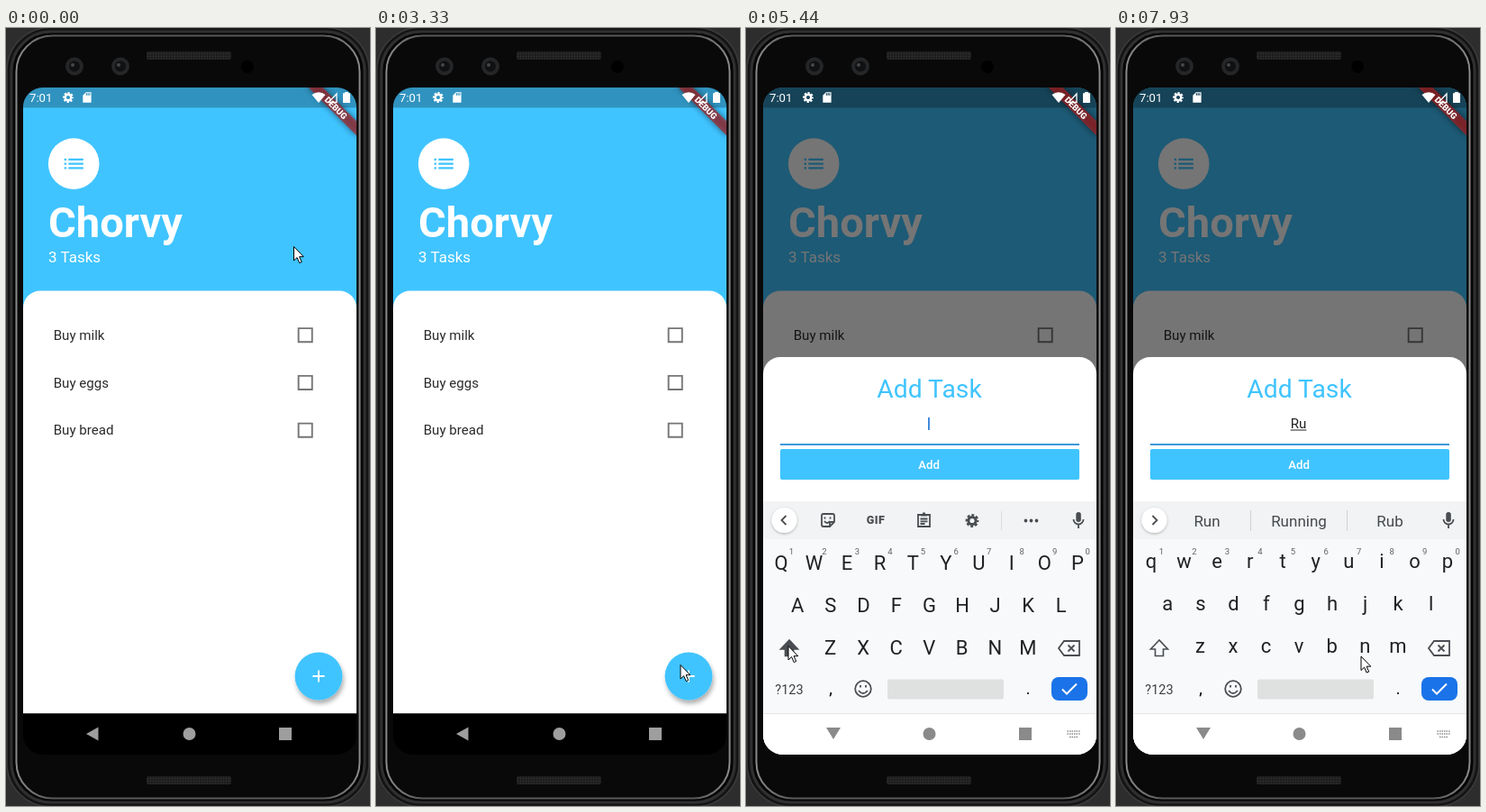
Animation of 404x863 px, one loop 8 s. Source, as an HTML page:

```html
<!DOCTYPE html>
<html lang="en">
<head>
<meta charset="utf-8">
<title>To-do app</title>
<style>
  html, body { margin: 0; width: 100%; height: 100%; overflow: hidden; background: #2d2d2d; }
  svg { display: block; width: 404px; height: 863px; font-family: Roboto, sans-serif; }
  .mid { text-anchor: middle; }
  .line { fill: none; stroke: #4a4d51; stroke-width: 1.8; }
</style>
</head>
<body>
<svg viewBox="0 0 404 863">
  <defs>
    <clipPath id="screen"><rect x="19" y="66" width="370" height="740" rx="22"/></clipPath>
    <clipPath id="fabClip"><circle cx="347" cy="719" r="26.4"/></clipPath>
    <linearGradient id="metal" x2="1" y2="0">
      <stop stop-color="#8a8a8a"/><stop offset=".1" stop-color="#5a5a5a"/>
      <stop offset=".9" stop-color="#5a5a5a"/><stop offset="1" stop-color="#8a8a8a"/>
    </linearGradient>
    <pattern id="mesh" width="3" height="3" patternUnits="userSpaceOnUse">
      <rect width="3" height="3" fill="#1b1b1b"/><circle cx="1.5" cy="1.5" r="1" fill="#303030"/>
    </pattern>
    <filter id="shadow" x="-50%" y="-50%" width="200%" height="200%">
      <feDropShadow dx="1.5" dy="4" stdDeviation="2.8" flood-opacity=".32"/>
    </filter>
    <filter id="soft" x="-50%" y="-50%" width="200%" height="200%">
      <feDropShadow dx="0" dy="1" stdDeviation="1.5" flood-opacity=".3"/>
    </filter>
    <filter id="blur" x="-20%" y="-150%" width="140%" height="400%">
      <feGaussianBlur stdDeviation="3.5"/>
    </filter>
    <g id="gear" fill="none" stroke="currentColor">
      <circle r="4.1" stroke-width="3"/>
      <circle r="6.2" stroke-width="2.4" stroke-dasharray="2.87 2" stroke-dashoffset="1.4"/>
    </g>
  </defs>

  <!-- phone body -->
  <rect x="1" y="-.5" width="402" height="864" rx="48" fill="#141414" stroke="#3c3c3c" stroke-width="1.5"/>
  <rect x="6" y="4" width="392" height="855" rx="44" fill="#050505" stroke="#303030" stroke-width="3"/>
  <rect x="11.5" y="8.5" width="381" height="846" rx="40" fill="#090909" stroke="url(#metal)" stroke-width="2"/>
  <rect x="156" y="26" width="94" height="9" rx="2" fill="url(#mesh)"/>
  <rect x="156" y="830" width="94" height="9" rx="2" fill="url(#mesh)"/>
  <g id="lenses"></g>
  <circle cx="268" cy="43" r="7" fill="#000"/>

  <g clip-path="url(#screen)">
    <!-- task list -->
    <rect x="19" y="66" width="370" height="400" fill="#40c4ff"/>
    <rect x="19" y="66" width="370" height="22.4" opacity=".25"/>
    <circle cx="75.2" cy="150.6" r="28.3" fill="#fff"/>
    <path transform="translate(61.1 136.5) scale(1.178)" fill="#40c4ff"
      d="M3 7h2v2H3zM3 11h2v2H3zM3 15h2v2H3zM7 7h14v2H7zM7 11h14v2H7zM7 15h14v2H7z"/>
    <g fill="#fff">
      <text x="47" y="232" font-size="47.1" font-weight="700">Chorvy</text>
      <text x="47" y="260" font-size="17">3 Tasks</text>
    </g>
    <path d="M19 310.5a19 19 0 0 1 19-19h332a19 19 0 0 1 19 19v450H19z" fill="#fff"/>
    <g id="tasks" font-size="15.1" fill="#2b2b2b"></g>
    <g filter="url(#shadow)"><circle cx="347" cy="719" r="26.4" fill="#40c4ff"/></g>
    <circle id="ripple" cx="340" cy="710" fill="#fff" clip-path="url(#fabClip)"/>
    <path d="M340.4 719h13.2M347 712.4v13.2" stroke="#fff" stroke-width="1.9"/>
    <rect id="barrier" x="19" y="66" width="370" height="694.5"/>

    <!-- bottom sheet -->
    <g id="sheet" class="mid">
      <path d="M19 384a19 19 0 0 1 19-19h332a19 19 0 0 1 19 19v142H19z" fill="#fff"/>
      <rect x="19" y="526" width="370" height="280" fill="#fafafa"/>
      <text x="203.5" y="410" font-size="28.3" fill="#40c4ff">Add Task</text>
      <text id="typed" x="202.5" y="444" font-size="15.1" fill="#212121"></text>
      <rect id="typedLine" y="445.5" height="1" fill="#212121"/>
      <rect id="caret" y="432" width="1.9" height="14" fill="#3a87dd"/>
      <rect x="38" y="461" width="332" height="2" fill="#3d98dc"/>
      <rect x="38" y="467" width="332" height="34" rx="2" fill="#40c4ff"/>
      <text x="203" y="489" font-size="13.2" font-weight="500" fill="#fff">Add</text>
    </g>

    <!-- keyboard -->
    <g id="keyboard" class="mid">
      <rect x="19" y="525" width="370" height="281" fill="#f8f9fb"/>
      <rect x="19" y="525" width="370" height="42" fill="#f1f3f4"/>
      <rect x="19" y="760" width="370" height="46" fill="#fff"/>
      <path d="M19 760.5h370" stroke="#e4e6e8"/>
      <circle cx="42.5" cy="546" r="14" fill="#fff" filter="url(#soft)"/>
      <path id="chevron" class="line"/>
      <g id="tools">
        <path class="line" d="M86 539h10a2 2 0 0 1 2 2v7l-5 5h-7a2 2 0 0 1-2-2v-10a2 2 0 0 1 2-2zM98 548h-5v5M87 547q3 4 6 0M87.5 542.5v2M93.5 542.5v2"/>
        <text x="144" y="550.3" font-size="12.5" font-weight="900" fill="#4a4d51" letter-spacing=".5">GIF</text>
        <path class="line" d="M191 540h13v13h-13zM194 540.5h7M193.5 544.5h8M193.5 547.3h8M193.5 550h5M196 538.5h3"/>
        <use href="#gear" x="251" y="546.5" color="#4a4d51"/>
        <path d="M283.5 536v21" stroke="#dadce0"/>
        <path d="M310.5 546.5h12.1" stroke="#4a4d51" stroke-width="3.8" stroke-linecap="round" stroke-dasharray="0 6"/>
      </g>
      <g id="hints" font-size="17" fill="#45484c">
        <path d="M149.5 535v23M256.5 535v23" stroke="#cfd2d5"/>
      </g>
      <rect x="366.3" y="537" width="5.5" height="11" rx="2.7" fill="#4a4d51"/>
      <path class="line" d="M363.5 545a5.5 5.5 0 0 0 11 0M369 551v4"/>
      <g id="keys" font-size="22" fill="#202124"></g>
      <path id="shift" d="M48 679l-9.5 10h5v7.5h9v-7.5h5z" stroke="#4a4d51" stroke-width="1.6"/>
      <path class="line" d="M353 680h17v16h-17l-6-8zM357.5 684.5l7 7M364.5 684.5l-7 7"/>
      <text x="48" y="738.5" font-size="14.5" fill="#3c4043">?123</text>
      <text x="94" y="739" font-size="18">,</text>
      <text x="313" y="739" font-size="18">.</text>
      <circle class="line" cx="130" cy="733" r="8.8"/>
      <path class="line" d="M125 735q5 6 10 0M127 729v2.5M133 729v2.5"/>
      <rect x="157" y="722.5" width="129" height="22" rx="2" fill="#dfe1e1"/>
      <rect x="339" y="720" width="40" height="26" rx="8" fill="#1a73e8"/>
      <path d="M351 733.5l5 5 11-11" fill="none" stroke="#fff" stroke-width="2"/>
      <g id="popup">
        <rect x="-18.5" y="506" width="37" height="105" rx="4" fill="#f2f4f5" filter="url(#soft)"/>
        <text id="popupKey" y="542" font-size="27"></text>
        <text x="9" y="554" font-size="13">…</text>
      </g>
    </g>

    <!-- navigation bar -->
    <g id="navLight" fill="#8a8a8a">
      <path d="M89 776h16l-8 13z"/><circle cx="203.5" cy="783" r="7"/><path d="M303 776h14v14h-14z"/>
      <path d="M356.5 780h14M356.5 783h14M359 786.5h9" stroke="#8a8a8a" stroke-width="1.5" stroke-dasharray="1.5 1"/>
    </g>
    <g id="navDark" fill="#9e9e9e">
      <rect x="19" y="760.5" width="370" height="45.5" fill="#000"/>
      <path d="M89 783l13.5-7.5v15z"/><circle cx="203.5" cy="783" r="7"/><path d="M303 776h14v14h-14z"/>
    </g>

    <!-- debug ribbon and status icons -->
    <g transform="translate(389 66) rotate(45)">
      <rect x="-37.7" y="26.4" width="75.4" height="11.3" opacity=".5" filter="url(#blur)"/>
      <rect x="-37.7" y="26.4" width="75.4" height="11.3" fill="#b71c1c" opacity=".63"/>
      <text class="mid" y="35.5" font-size="9.6" font-weight="900" fill="#fff">DEBUG</text>
    </g>
    <g fill="#fff" color="#fff">
      <text x="26" y="82" font-size="13.2">7:01</text>
      <use href="#gear" transform="translate(69 77) scale(.8)"/>
      <path transform="translate(83 70) scale(.58)" fill-rule="evenodd"
        d="M18 2h-8L4 8v14h16V2zM10 4h2v4h-2zM13 4h2v4h-2zM16 4h2v4h-2z"/>
      <path d="M347 83l-7.5-9a12 12 0 0 1 15 0z"/>
      <path d="M358 82.5h9v-9.5z" fill="none" stroke="#fff" stroke-width="1.3"/>
      <path d="M376 71h4v1.3h2v10.7h-8v-10.7h2z"/>
    </g>
  </g>

  <circle id="click" r="12" fill="#ffff50" fill-opacity=".75"/>
  <path id="cursor" d="M.5.5v15.5l3.6-3.4 2.6 6 2.5-1.1-2.6-5.8h4.7z" fill="#fff" stroke="#000"/>
</svg>

<script>
const $ = id => document.getElementById(id);
const DURATION = 8000;
const FOCUS = 4000, TYPE_R = 6380, TYPE_U = 7180;
const CHECK = 1380, UNCHECK = 2220, SHEET = 3690, IME = 3950;

function add(parent, tag, attrs, text = '') {
  const el = document.createElementNS('http://www.w3.org/2000/svg', tag);
  set(el, attrs);
  el.textContent = text;
  return parent.appendChild(el);
}
function set(el, attrs) { for (const name in attrs) el.setAttribute(name, attrs[name]); }
const show = (el, on) => { el.style.display = on ? '' : 'none'; };
const clamp = v => Math.max(0, Math.min(1, v));
const progress = (t, start, length) => clamp((t - start) / length);
const between = (t, [a, b]) => t >= a && t < b;

for (const x of [76, 127]) {
  add($('lenses'), 'circle', { cx: x, cy: 42.5, r: 10, fill: '#252628' });
  add($('lenses'), 'circle', { cx: x, cy: 42.5, r: 6, fill: '#101113' });
  add($('lenses'), 'circle', { cx: x - 2, cy: 41, r: 2, fill: '#44474b' });
}

const tasks = ['Buy milk', 'Buy eggs', 'Buy bread'].map((name, i) => {
  const y = 340.7 + i * 52.75;
  const label = add($('tasks'), 'text', { x: 52.7, y: y + 5.2 }, name);
  const box = add($('tasks'), 'path', { 'fill-rule': 'evenodd' });
  return { y, label, box };
});
const milk = tasks[0];
const milkTick = add($('tasks'), 'path', { d: 'M327 341l3.8 3.8 7-7.5', fill: 'none', stroke: '#fff', 'stroke-width': 1.9, pathLength: 1 });

const keys = [];
['qwertyuiop', 'asdfghjkl', 'zxcvbnm'].forEach((row, r) => [...row].forEach((letter, i) => {
  const x = [39, 57.3, 93.5][r] + i * 36.55, y = 598.7 + r * 47.3;
  keys.push({ letter, y, el: add($('keys'), 'text', { x }) });
  if (!r) add($('keys'), 'text', { x: x + 11.3, y: 583.5, 'font-size': 9.5, fill: '#5f6368' }, (i + 1) % 10);
}));
const hints = [101, 203, 304].map(x => add($('hints'), 'text', { x, y: 553 }));

// time, x, y of the pointer tip
const path = [
  [200, 319, 242], [640, 338, 305], [1000, 332, 338], [2340, 332, 338], [2850, 324, 590],
  [2900, 324, 590], [3330, 337.5, 706], [3650, 337.5, 706], [4050, 241.5, 587], [4360, 195, 600],
  [4450, 195, 600], [5290, 46.5, 685], [5440, 46.5, 685], [5990, 151.5, 594], [6400, 151.5, 594],
  [6600, 206, 596], [6700, 206, 596], [6920, 258, 596], [7250, 258, 596], [7700, 273, 694],
  [7780, 273, 694], [7930, 271.5, 696.5]
];
function pointer(t) {
  const next = path.findIndex(p => p[0] > t);
  if (next < 1) return path.at(next).slice(1);
  const [a, b] = [path[next - 1], path[next]];
  const k = progress(t, a[0], b[0] - a[0]), s = k * k * (3 - 2 * k);
  return [a[1] + (b[1] - a[1]) * s, a[2] + (b[2] - a[2]) * s];
}

const clicks = [[1240, 1380], [2070, 2220], [3500, 3580], [5360, 5440], [6140, TYPE_R], [7090, TYPE_U]];

// The box shrinks by its border width halfway, while the hole closes.
function drawCheckbox({ y, box }, checked) {
  const fill = clamp(checked * 2);
  const outer = 8.5 - .95 * (1 - Math.abs(checked * 2 - 1)), hole = 6.6 * (1 - fill);
  const square = r => `M${332.2 - r} ${y - r}h${2 * r}v${2 * r}h${-2 * r}z`;
  set(box, { d: square(outer) + square(hole) });
  box.style.fill = `color-mix(in srgb, #40c4ff ${fill * 100}%, #757575)`;
}

function drawTasks(t) {
  const checked = progress(t, CHECK, 200) - progress(t, UNCHECK, 200);
  for (const task of tasks) drawCheckbox(task, task === milk ? checked : 0);
  show(milkTick, checked > .5);
  set(milkTick, { 'stroke-dasharray': `${clamp(checked * 2 - 1)} 2` });
  milk.label.style.textDecoration = between(t, [CHECK, UNCHECK]) ? 'line-through' : 'none';
  set($('ripple'), { r: 36 * progress(t, 3500, 230), opacity: .25 * (1 - progress(t, 3650, 200)) });
}

function drawSheet(t) {
  const rise = 1 - (1 - progress(t, SHEET, 250)) ** 3;
  const ime = progress(t, IME, 250), fade = 1 - (1 - ime) ** 2;
  set($('barrier'), { opacity: .54 * progress(t, SHEET, 250) });
  show($('sheet'), rise > 0);
  set($('sheet'), { transform: `translate(0 ${t < IME ? 235 + 161 * (1 - rise) : 0})` });
  show($('keyboard'), ime > 0);
  set($('keyboard'), { transform: `translate(0 ${208 * (1 - ime) ** 3})`, opacity: fade });
  set($('navLight'), { opacity: fade });
  set($('navDark'), { opacity: 1 - fade });
}

function drawTyping(t) {
  const text = t < TYPE_R ? '' : t < TYPE_U ? 'R' : 'Ru';
  $('typed').textContent = text;
  const width = text ? $('typed').getComputedTextLength() : 0;
  set($('typedLine'), { x: 202.5 - width / 2, width });
  const reset = t < TYPE_R ? FOCUS : t < TYPE_U ? TYPE_R : TYPE_U;
  show($('caret'), t >= FOCUS && Math.floor((t - reset) / 500) % 2 === 0);
  set($('caret'), { x: 202 + width / 2 });

  const upper = between(t, [5400, TYPE_R]);
  for (const { letter, y, el } of keys) {
    el.textContent = upper ? letter.toUpperCase() : letter;
    set(el, { y: upper ? y + 1.8 : y });
  }
  set($('shift'), { fill: upper ? '#4a4d51' : 'none' });

  show($('tools'), !text);
  show($('hints'), text);
  set($('chevron'), { d: text ? 'M40.5 541l5 5-5 5' : 'M44.5 541l-5 5 5 5' });
  const words = t < 7850 ? ['Red', 'Read', 'Remove'] : ['Run', 'Running', 'Rub'];
  hints.forEach((el, i) => { el.textContent = words[i]; });

  const first = between(t, [6200, TYPE_R + 40]), second = between(t, [7130, 7250]);
  show($('popup'), first || second);
  set($('popup'), { transform: `translate(${first ? 148.5 : 258.3} 0)` });
  $('popupKey').textContent = first ? 'R' : 'u';
}

function frame(now) {
  const t = now % DURATION;
  drawTasks(t);
  drawSheet(t);
  drawTyping(t);
  const [x, y] = pointer(t);
  set($('cursor'), { transform: `translate(${x} ${y})` });
  show($('click'), clicks.some(c => between(t, c)));
  set($('click'), { cx: x, cy: y });
  requestAnimationFrame(frame);
}
requestAnimationFrame(frame);
</script>
</body>
</html>
```
